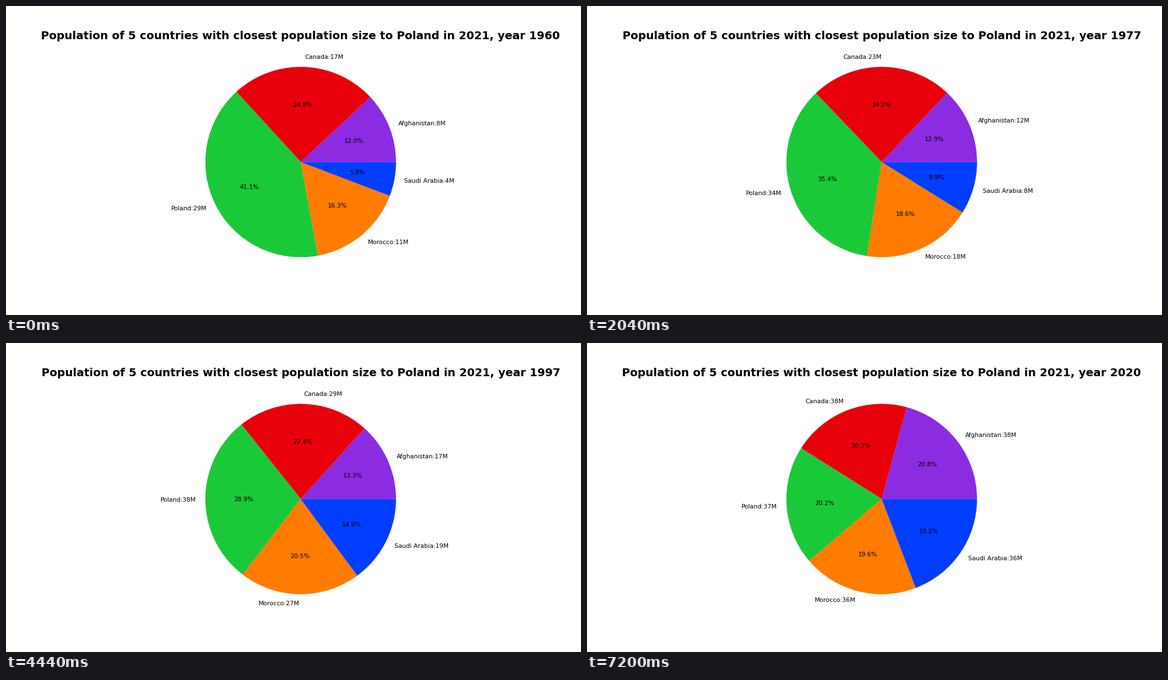
Animation, 1020 px wide and 549 px high, one loop 7320 ms. Source, as a matplotlib script:

```python
import matplotlib.pyplot as plt
import numpy as np
from matplotlib.animation import FuncAnimation

WIDTH, HEIGHT, DPI = 1020, 549, 80
SCALE = WIDTH / 13 / DPI  # type sizes are set for a 13 inch wide figure
YEARS = np.arange(1960, 2021)

# Populations in millions at a few key years, plus sudden bends.
KEY_YEARS = [1960, 1967, 1977, 1986, 1997, 2005, 2013, 2020]
COUNTRIES = {
    "Afghanistan": ("#8b2be2", [8.62, 10.01, 12.69, 10.45, 17.79, 24.41, 31.54, 38.97],
                    {1979: 12.99, 1983: 9.95, 1991: 10.75, 1994: 15.46, 2001: 19.69}),
    "Canada": ("#e8000b", [17.91, 20.41, 23.73, 26.1, 29.91, 32.24, 35.08, 38.01], {}),
    "Poland": ("#1ac938", [29.64, 31.99, 34.69, 37.46, 38.65, 38.165, 38.03, 37.89],
               {1972: 33.06, 1999: 38.66, 2000: 38.26}),
    "Morocco": ("#ff7c00", [11.77, 14.09, 18.23, 22.85, 27.4, 30.43, 33.72, 36.69], {}),
    "Saudi Arabia": ("#023eff", [4.17, 5.4, 8.72, 13.46, 19.9, 24.4, 31.48, 36.0], {}),
}


def smooth_curve(points, x):
    """Cubic Hermite curve through the points that never overshoots them."""
    px, py = np.array(sorted(points.items())).T
    step = np.diff(px)
    slope = np.diff(py) / step
    before, after = slope[:-1], slope[1:]
    steady = before * after > 0
    inner = np.where(steady, 2 * before * after / np.where(steady, before + after, 1), 0)
    tangent = np.concatenate([slope[:1], inner, slope[-1:]])

    i = np.clip(np.searchsorted(px, x, side="right") - 1, 0, len(step) - 1)
    t = (x - px[i]) / step[i]
    ease = t * t * (3 - 2 * t)
    bend = t * (1 - t) * ((1 - t) * tangent[i] - t * tangent[i + 1])
    return py[i] + ease * (py[i + 1] - py[i]) + step[i] * bend


COLORS = [color for color, _, _ in COUNTRIES.values()]
POPULATION = np.array([
    smooth_curve(dict(zip(KEY_YEARS, values)) | bends, YEARS)
    for _, values, bends in COUNTRIES.values()
])

plt.rcParams["font.family"] = "DejaVu Sans"
fig, ax = plt.subplots(figsize=(WIDTH / DPI, HEIGHT / DPI), dpi=DPI)


def draw(frame):
    sizes = POPULATION[:, frame]
    labels = [f"{name}:{int(size)}M" for name, size in zip(COUNTRIES, sizes)]
    ax.clear()
    ax.pie(sizes, labels=labels, colors=COLORS, autopct="%1.1f%%",
           textprops={"fontsize": 10 * SCALE})
    ax.set_title("Population of 5 countries with closest population size "
                 f"to Poland in 2021, year {YEARS[frame]}",
                 fontsize=18.04 * SCALE, fontweight="bold", pad=6 * SCALE)


anim = FuncAnimation(fig, draw, frames=len(YEARS), init_func=lambda: draw(0),
                     interval=120, repeat=True, repeat_delay=0)
plt.show()
```
